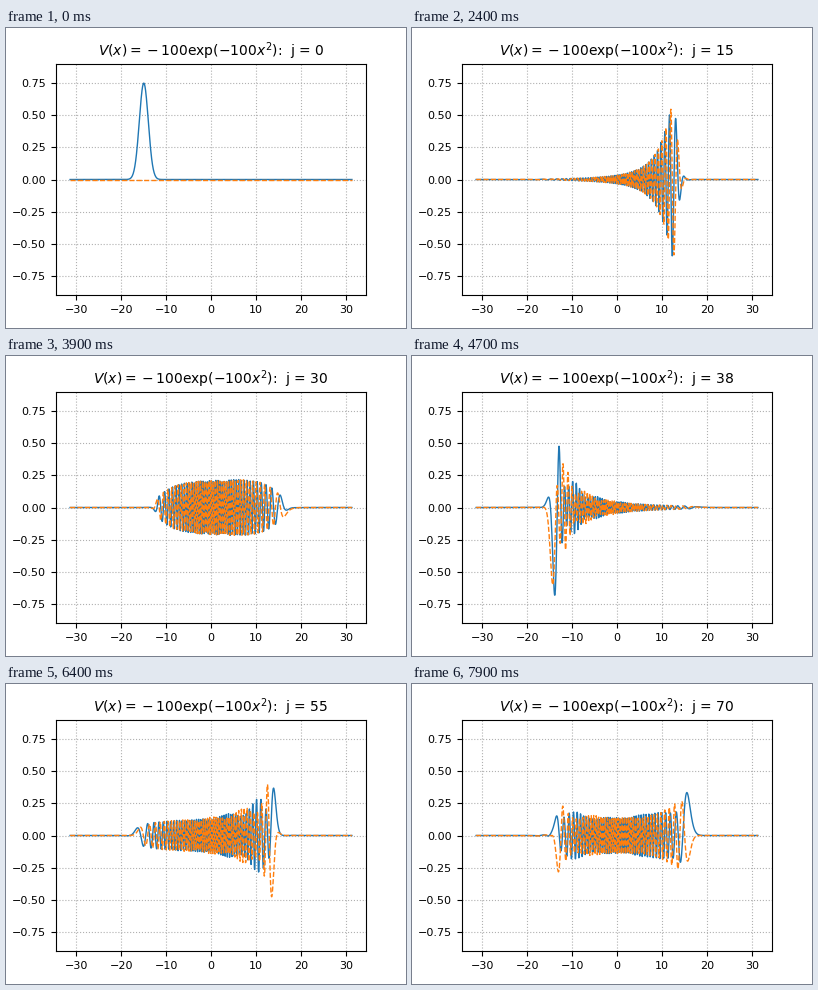
Recreate the animation shown at these times as a matplotlib script. Size 400x300 px, loop 8 s.

```python
import numpy as np
import matplotlib.pyplot as plt
from matplotlib.animation import FuncAnimation

HOLD, FRAMES, INTERVAL = 9, 80, 100
N, L = 1024, 20 * np.pi
DT, SUBSTEPS = 50 / 199, 50

x = np.linspace(-L / 2, L / 2, N, endpoint=False)
k = 2 * np.pi * np.fft.fftfreq(N, L / N)
V = -100 * np.exp(-x**2 / 100)


def evolve(count):
    """Split-step Schroedinger evolution of a Gaussian released at x = -15."""
    h = DT / SUBSTEPS
    half_v = np.exp(-0.5j * h * V)
    kinetic = np.exp(-0.5j * h * k**2)
    psi = np.pi**-0.25 * np.exp(-(x + 15)**2 / 2) + 0j
    states = [psi]
    for _ in range(count):
        for _ in range(SUBSTEPS):
            psi = half_v * np.fft.ifft(kinetic * np.fft.fft(half_v * psi))
        states.append(psi)
    return states


states = evolve(FRAMES - 1 - HOLD)

plt.rcParams.update({"font.family": "DejaVu Sans", "font.size": 8,
                     "text.kerning_factor": 6})
fig, ax = plt.subplots(figsize=(4, 3), dpi=100)
real, = ax.plot(x, states[0].real, lw=1)
imag, = ax.plot(x, states[0].imag, "--", lw=1)
ax.set_ylim(-0.9, 0.9)
ax.set_yticks(np.linspace(-0.75, 0.75, 7))
ax.grid(linestyle=":")
title = ax.set_title("", fontsize=10)


def update(frame):
    j = max(0, frame - HOLD)
    real.set_ydata(states[j].real)
    imag.set_ydata(states[j].imag)
    title.set_text(rf"$V(x)=-100\exp(-100x^2)$:  j = {j}")
    return real, imag, title


anim = FuncAnimation(fig, update, frames=FRAMES, interval=INTERVAL, repeat=True)
plt.show()
```
